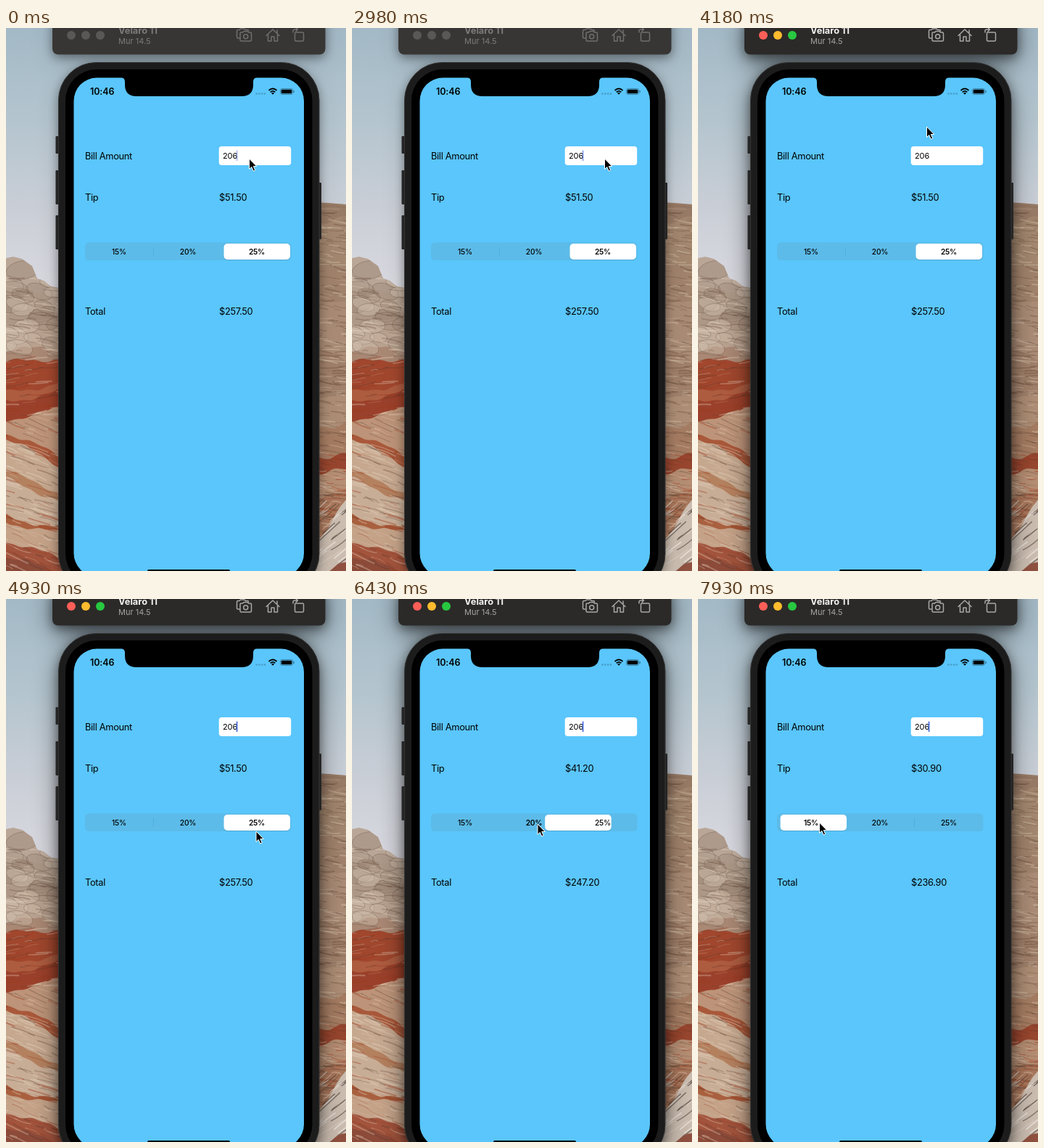
Recreate the animation shown at these times as an HTML page with a canvas. Size 469 px wide and 748 px high, loop 8000 ms.

```html
<!DOCTYPE html>
<html lang="en">
<head>
<meta charset="utf-8">
<title>Tip calculator</title>
<style>
  html, body { margin: 0; width: 100%; height: 100%; overflow: hidden; background: #b5c3cd; }
  canvas, svg { position: absolute; left: 0; top: 0; width: 469px; height: 748px; }
  text { font-family: Inter, Roboto, sans-serif; }
  .label { font-size: 12.8px; letter-spacing: -.3px; }
  .segment { font-size: 10.2px; letter-spacing: -.2px; text-anchor: middle; font-weight: 500; }
  .icon { fill: none; stroke-width: 1.5; stroke-linejoin: round; stroke-linecap: round; }
  .soft { filter: blur(7px); }
  .wide { filter: blur(17px); }
</style>
</head>
<body>
<canvas id="desert" width="469" height="748"></canvas>
<svg viewBox="0 0 469 748">
  <defs>
    <g id="silhouette">
      <rect x="64" y="-20" width="377" height="57" rx="9"/>
      <rect x="72" y="47" width="360" height="730" rx="53"/>
    </g>
  </defs>
  <use href="#silhouette" class="soft" y="4" opacity=".38"/>
  <use id="deepShadow" href="#silhouette" class="wide" y="10"/>

  <rect id="bar" x="64" y="-20" width="376.500" height="56.500" rx="8"/>
  <g id="lights"><circle cx="90" cy="10" r="6"/><circle cx="110" cy="10" r="6"/><circle cx="130" cy="10" r="6"/></g>
  <text id="device" x="155" y="8" font-size="12.8" font-weight="700">Velaro 11</text>
  <text id="system" x="155" y="22" font-size="11">Mur 14.5</text>
  <g id="icons" class="icon">
    <path d="M322 14H320Q318.500 14 318.500 12.500V4Q318.500 2.500 320 2.500H322L323.500 1H329L330.500 2.500H333Q334.500 2.500 334.500 4"/>
    <path d="M324 6H326.500L328 4.500H333L334.500 6H337Q338.500 6 338.500 7.500V16.500Q338.500 18 337 18H324.500Q323 18 323 16.500V7.500Q323 6 324 6Z"/>
    <circle cx="330.700" cy="11.800" r="3"/>
    <path d="M359 10.500L368 2L377 10.500M361.500 9V18H366V12H370V18H374.500V9M374 3V7"/>
    <path d="M400 6H409Q410.500 6 410.500 7.500V16.500Q410.500 18 409 18H400Q398.500 18 398.500 16.500V7.500Q398.500 6 400 6ZM396 6V4Q396 2 398.500 2H402M400 -.5L402.500 2L400 4.500"/>
  </g>

  <g fill="#242424">
    <rect x="68.500" y="149" width="5" height="24" rx="1"/>
    <rect x="68.500" y="196" width="5" height="47" rx="1"/>
    <rect x="68.500" y="258" width="5" height="47" rx="1"/>
    <rect x="431" y="213" width="4" height="78" rx="1"/>
  </g>
  <rect x="72.500" y="47.500" width="359.500" height="729" rx="52" fill="#1c1c1c" stroke="#343434"/>
  <rect x="82" y="57" width="340.500" height="710" rx="43"/>
  <rect x="93.500" y="68.500" width="317.500" height="687" rx="32" fill="#5ac6fb"/>
  <path d="M159 68H346Q341 69 341 74V78Q341 94 325 94H180Q164 94 164 78V74Q164 69 159 68Z"/>
  <rect x="195" y="746" width="114" height="4" rx="2"/>

  <text x="116" y="92" font-size="12.500" font-weight="600" letter-spacing="-.1">10:46</text>
  <g fill="#479dc7">
    <circle cx="345.500" cy="90.500" r="1.300"/><circle cx="349.300" cy="90.500" r="1.300"/>
    <circle cx="353.100" cy="90.500" r="1.300"/><circle cx="356.900" cy="90.500" r="1.300"/>
  </g>
  <path d="M362.500 86Q368 81 373.500 86M364.700 88.300Q368 85.500 371.300 88.300" fill="none" stroke="#000" stroke-width="1.700"/>
  <path d="M366 89.700Q368 88 370 89.700L368 91.800Z"/>
  <rect x="378.500" y="83.500" width="17" height="8" rx="2.300" fill="none" stroke="#000" stroke-opacity=".4" stroke-width=".8"/>
  <rect x="379.700" y="84.700" width="14.600" height="5.600" rx="1.200"/>
  <rect x="396.500" y="86" width="1.200" height="3" rx=".6" opacity=".45"/>

  <g class="label">
    <text x="109" y="180.500">Bill Amount</text>
    <text x="109" y="238">Tip</text>
    <text x="109" y="395">Total</text>
    <text id="tip" x="294" y="238"></text>
    <text id="total" x="294" y="395"></text>
  </g>
  <rect x="293.700" y="163" width="99.500" height="26" rx="4" fill="#fff"/>
  <text x="299" y="180" font-size="11" letter-spacing="-.1">206</text>
  <rect id="caret" x="317.800" y="168.500" width="1.600" height="14.500" rx=".6" fill="#3f66e0"/>

  <rect x="109" y="295.500" width="284.500" height="24.500" rx="5.500" fill="#5cbbe8"/>
  <rect id="divider" y="302" width="1" height="12" fill="#54aed9"/>
  <rect id="thumbShadow" y="298.500" width="91.500" height="21.500" rx="5" fill="#318bb5" opacity=".45"/>
  <rect id="thumb" y="297" width="91.500" height="22" rx="5" fill="#fff"/>
  <g id="segments" class="segment">
    <text x="156" y="311.500">15%</text><text x="251" y="311.500">20%</text><text x="346" y="311.500">25%</text>
  </g>

  <path id="pointer" d="M0 0V14.500L3.300 11.400L5.700 17L8.200 15.900L5.800 10.500H10.300Z" stroke="#fff" stroke-width="1" stroke-linejoin="round"/>
</svg>
<script>
const $ = id => document.getElementById(id);
const clamp = v => Math.max(0, Math.min(1, v));

function paintDesert() {
  const c = $('desert').getContext('2d');
  let seed = 7;
  const random = () => (seed = seed * 16807 % 2147483647) / 2147483647;
  const between = (a, b) => a + random() * (b - a);

  const sky = c.createLinearGradient(0, 0, 0, 350);
  [[0, '#a3b9c6'], [.35, '#b3c4ce'], [.7, '#c9ced6'], [1, '#d8d8df']].forEach(s => sky.addColorStop(...s));
  c.fillStyle = sky;
  c.fillRect(0, 0, 469, 748);

  function clipRock(x0, x1, outline, base) {
    c.beginPath();
    c.moveTo(x0, 748);
    outline.forEach(p => c.lineTo(...p));
    c.lineTo(x1, 748);
    c.clip();
    c.fillStyle = base;
    c.fillRect(x0, 0, x1 - x0, 748);
  }

  // Each band is [height at left, height at right, colour].
  function strata(x0, x1, bands, wave) {
    bands.forEach(([a, b, color], i) => {
      c.beginPath();
      c.moveTo(x0, 748);
      for (let x = x0; x <= x1; x += 2) {
        const u = (x - x0) / (x1 - x0);
        c.lineTo(x, a + (b - a) * u + wave * Math.sin(u * 5 + i) + Math.sin(x * .23 + i * 2));
      }
      c.lineTo(x1, 748);
      c.fillStyle = color;
      c.fill();
    });
  }

  function boulders(count, x0, x1, top, bottom) {
    for (let i = 0; i < count; i++) {
      const y = top + (bottom - top) * i / count + between(0, 8), r = between(10, 24);
      c.beginPath();
      c.ellipse(between(x0, x1), y + r * .5, r, r * .55, between(-.3, .4), 0, 7);
      c.fillStyle = random() < .5 ? 'rgba(208,189,172,.4)' : 'rgba(150,127,110,.3)';
      c.fill();
      c.strokeStyle = 'rgba(92,70,56,.4)';
      c.lineWidth = .8;
      c.stroke();
    }
  }

  function streaks(count, x0, x1, top, bottom, colors, tilt) {
    for (let i = 0; i < count; i++) {
      const x = between(x0 - 15, x1), y = between(top, bottom);
      const length = between(8, 34), drop = length * (tilt + between(-.15, .15));
      c.strokeStyle = colors[i % colors.length];
      c.lineWidth = between(.5, 2);
      c.beginPath();
      c.moveTo(x, y);
      c.quadraticCurveTo(x + length / 2, y + drop / 2 + between(-3, 3), x + length, y + drop);
      c.stroke();
    }
  }

  const brown = 'rgba(84,56,40,.28)', cream = 'rgba(232,214,194,.35)', red = 'rgba(156,56,28,.4)';

  c.save();
  clipRock(0, 80, [[0, 317], [10, 315], [22, 318], [36, 328], [43, 345], [52, 348], [62, 356], [80, 359]], '#b9a697');
  strata(0, 80, [[345, 378, '#b5a190'], [378, 398, '#ad9786'], [410, 402, '#b8a18f'], [446, 438, '#a98874'],
    [462, 453, '#a1472e'], [503, 487, '#ad5c40'], [514, 500, '#9b412b'], [538, 526, '#bd9479'],
    [556, 594, '#a9583a'], [566, 606, '#c6a88f'], [612, 640, '#b4815f'], [622, 652, '#c8ad96'],
    [672, 690, '#a9603f'], [679, 699, '#c4a288'], [705, 734, '#a2543d'], [728, 752, '#8c4a39']], 4);
  boulders(22, 0, 80, 322, 436);
  streaks(70, 0, 80, 330, 455, [brown, cream], .15);
  streaks(60, 0, 80, 455, 535, [brown, red, cream], -.15);
  streaks(170, 0, 80, 535, 748, [brown, cream, red, cream], .35);
  c.restore();

  c.save();
  clipRock(425, 469, [[425, 240], [445, 241], [469, 243]], '#987b66');
  strata(425, 469, [[268, 262, '#a3876f'], [320, 335, '#a1836c'], [385, 376, '#aa8c76'], [440, 455, '#a0806a'],
    [515, 500, '#ad8d75'], [552, 545, '#a57c62'], [592, 588, '#98462f'], [612, 609, '#b58e73'],
    [650, 640, '#a9785c']], 3);
  streaks(260, 425, 469, 242, 700, [brown, brown, cream], .1);
  streaks(20, 425, 469, 580, 700, [red], .1);
  strata(425, 469, [[712, 652, '#cbbdb0']], 3);
  streaks(34, 425, 469, 665, 745, ['rgba(60,45,38,.5)', 'rgba(245,238,230,.6)'], -.8);
  strata(425, 469, [[752, 738, '#8f5140']], 3);
  c.restore();
}

// Pointer tip: [time, x, y]
const path = [
  [0, 335.5, 180], [1050, 348.5, 181], [1190, 348.5, 180], [3730, 348.5, 180], [3880, 330, 150],
  [4030, 316.5, 137], [4180, 315.5, 136], [4480, 330, 185], [4780, 332, 240], [4930, 345, 320],
  [5080, 356, 390], [5230, 367, 375], [5380, 368, 320], [5530, 363.5, 270], [5830, 358, 297],
  [6280, 262, 308], [6580, 250, 312], [6880, 225, 314], [7030, 184.5, 315.5], [7330, 165, 309],
  [7930, 167.5, 308], [8000, 167.5, 308]
];

function pointerAt(t) {
  const i = path.findIndex(p => p[0] > t);
  const [t0, x0, y0] = path[i - 1], [t1, x1, y1] = path[i];
  const u = (t - t0) / (t1 - t0);
  return [x0 + (x1 - x0) * u, y0 + (y1 - y0) * u];
}

function thumbAt(t) {
  const settle = start => t < start ? 1 : Math.exp((start - t) / 67);
  return 110.5 + 95 * (settle(6400) + settle(7700));
}

function caretOpacity(t) {
  const phase = t % 1000;
  const fadeOut = 1 - ((phase + 60) % 1000) / 110;
  return phase >= 940 || phase < 60 ? clamp(fadeOut) : clamp((phase - 320) / 105);
}

function showWindow(active) {
  $('bar').setAttribute('fill', active ? '#2b2a28' : '#383634');
  $('device').setAttribute('fill', active ? '#f2f2f1' : '#7d7b79');
  $('system').setAttribute('fill', active ? '#a5a4a2' : '#7d7b79');
  $('icons').setAttribute('stroke', active ? '#a9a8a6' : '#706e6c');
  $('deepShadow').setAttribute('opacity', active ? .5 : .12);
  const colors = active ? ['#fe5f57', '#febc2e', '#28c840'] : Array(3).fill('#5a5856');
  [...$('lights').children].forEach((light, i) => light.setAttribute('fill', colors[i]));
}

let wasActive;
function render(time) {
  // The picture advances in 150 ms steps.
  const t = time < 1180 ? Math.floor(time / 150) * 150 : Math.floor((time + 20) / 150) * 150 - 20;
  const active = t >= 4180;
  if (active !== wasActive) showWindow(wasActive = active);

  const selected = t < 6400 ? 2 : t < 7700 ? 1 : 0;
  const tip = 206 * [.15, .2, .25][selected];
  $('tip').textContent = '$' + tip.toFixed(2);
  $('total').textContent = '$' + (206 + tip).toFixed(2);
  [...$('segments').children].forEach((s, i) => s.style.fontWeight = i === selected ? 600 : 500);
  $('divider').setAttribute('x', selected === 2 ? 203 : 298);
  $('divider').setAttribute('opacity', selected === 1 ? 0 : 1);
  for (const id of ['thumb', 'thumbShadow']) $(id).setAttribute('x', thumbAt(t));
  $('caret').setAttribute('opacity', caretOpacity(t));
  $('pointer').setAttribute('transform', `translate(${pointerAt(t)})`);
}

paintDesert();
const start = performance.now();
function tick() {
  render((performance.now() - start) % 8000);
  requestAnimationFrame(tick);
}
tick();
</script>
</body>
</html>
```
